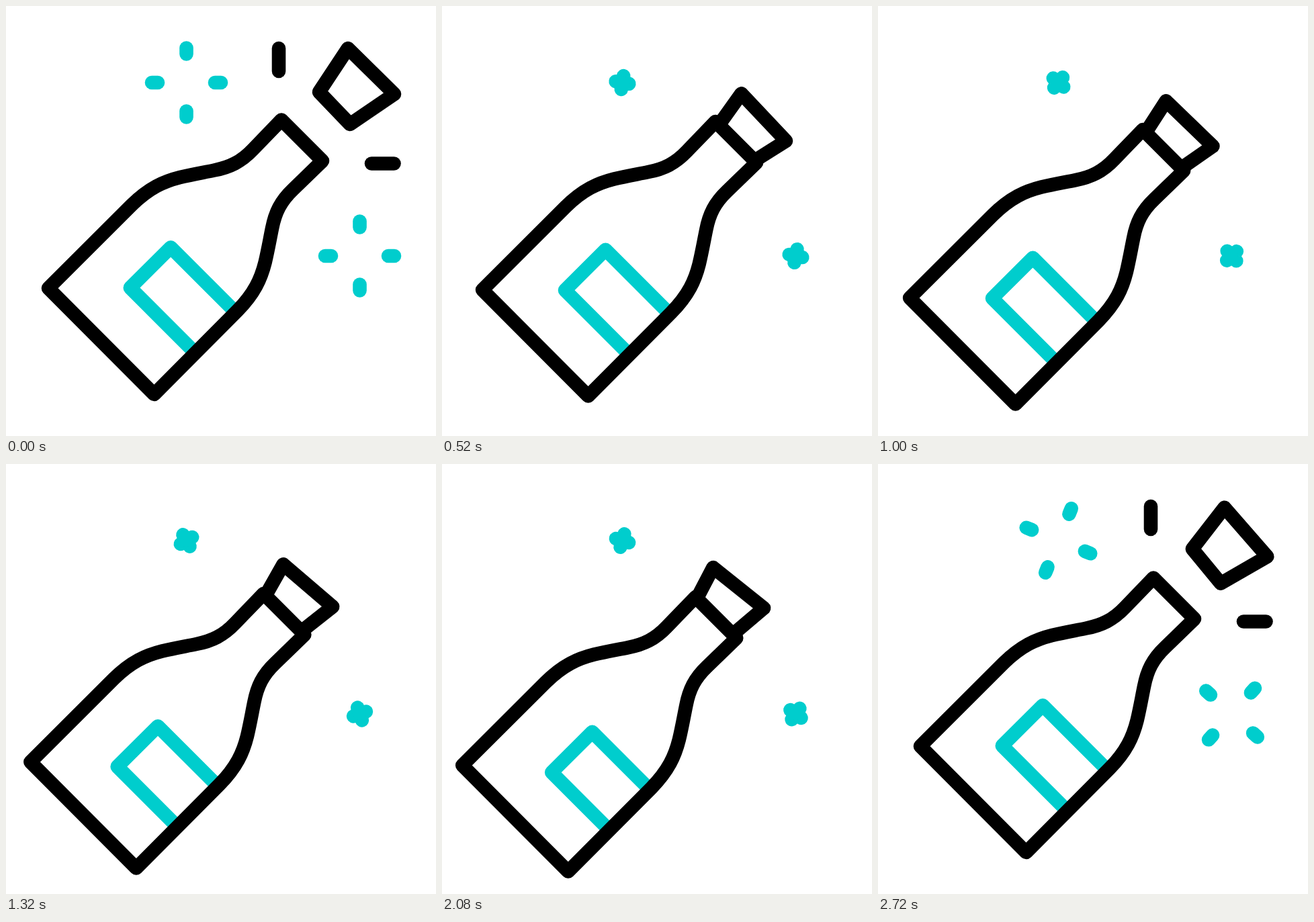
Recreate the animation shown at these times as an HTML page with a canvas. Size 640 by 640 pixels, loop 2.92 s.

```html
<!DOCTYPE html>
<html>
<head>
<meta charset="utf-8">
<style>
html, body { margin: 0; height: 100%; overflow: hidden; background: #fff; }
canvas { display: block; width: 100vmin; height: 100vmin; }
</style>
</head>
<body>
<canvas id="stage" width="640" height="640"></canvas>
<script>
const ctx = document.getElementById('stage').getContext('2d');
const BLACK = '#000', CYAN = '#00cdcd';
const STEP = 40, LAST = 68, LOOP = 2920;

const bottle = new Path2D(`M63 420 L187 296.3 C213 270.7 235 261 259 255 C277 250.7 293 248 310 244.5
  C333 240 350 232 367.5 213.5 L410 169.5 L471 230.5 L427.1 273.1 C408.6 290.6 400.6 307.6 396.1 330.6
  C392.6 347.6 389.9 363.6 385.6 381.6 C379.6 405.6 369.9 427.6 344.3 453.6 L220.5 578 Z`);
const label = new Path2D('M370 484 L245.2 359.2 L184.8 419.4 L310 544.6');
const cork = new Path2D('M509 63 L578 131 L512 176 L466 128 Z');
const corkPivot = [489, 152];

const clamp = u => Math.min(1, Math.max(0, u));
const ease = u => (u = clamp(u), u * u * (3 - 2 * u));
const mix = (a, b, u) => a + (b - a) * u;

// Close the cork, shake between low and high, pop to a peak, settle.
const times = [0, 12, 18, 24, 30, 36, 42, 48, 54, 60, 68];
function track(n, start, closed, low, high, peak, end) {
  const values = [start, closed, low, high, low, high, low, high, low, peak, end];
  let i = 0;
  while (i < times.length - 2 && n >= times[i + 1]) i++;
  return mix(values[i], values[i + 1], ease((n - times[i]) / (times[i + 1] - times[i])));
}

function line(x1, y1, x2, y2, color) {
  ctx.strokeStyle = color;
  ctx.beginPath();
  ctx.moveTo(x1, y1);
  ctx.lineTo(x2, y2);
  ctx.stroke();
}

function group(x, y, degrees, paint) {
  ctx.save();
  ctx.translate(x, y);
  ctx.rotate(degrees * Math.PI / 180);
  paint();
  ctx.restore();
}

function sparkle(x, y, degrees, spread) {
  const inner = mix(1, 42.5, spread);
  for (let k = 0; k < 4; k++)
    group(x, y, degrees + 90 * k, () => line(0, -inner, 0, -inner - 9, CYAN));
}

function drawBottle(n) {
  const slide = track(n, 0, 0, 15, 0, 0, 0);
  group(track(n, 0, 0, -39.3, -14, 26.5, 0), track(n, 0, 0, 34, 13, -26.7, 0), 0, () => {
    ctx.fill(bottle);
    ctx.save();
    ctx.clip(bottle);
    ctx.translate(slide, slide);
    ctx.strokeStyle = CYAN;
    ctx.stroke(label);
    ctx.restore();
    ctx.strokeStyle = BLACK;
    ctx.stroke(bottle);
  });
}

function drawCork(n) {
  const [px, py] = corkPivot;
  const x = track(n, 0, -63.8, -102.8, -77.5, 48, 0);
  const y = track(n, 0, 64, 98, 77, -55, 0);
  group(px + x, py + y, track(n, 0, 2.9, -8, 0, 8.5, 4.3), () => {
    ctx.translate(-px, -py);
    ctx.fill(cork);
    ctx.strokeStyle = BLACK;
    ctx.stroke(cork);
  });
}

function draw(n) {
  const spread = n < 30 ? 1 - ease(n / 9) : ease((n - 54) / 6);
  const turn = clamp((n - 9) / 45);
  ctx.fillStyle = '#fff';
  ctx.fillRect(0, 0, 640, 640);
  ctx.lineWidth = 20.6;
  ctx.lineCap = ctx.lineJoin = 'round';

  if (spread > 0) {
    const x = mix(417.5, 406, spread), y = mix(203.5, 234.5, spread);
    line(x, mix(148, 63, spread), x, mix(159, 97, spread), BLACK);
    line(mix(461, 544, spread), y, mix(475, 577.5, spread), y, BLACK);
  }
  drawCork(n);
  drawBottle(n);
  sparkle(268.5, 114, 112 * turn, spread);
  sparkle(526.5, 372, 132 * turn, spread);
}

function tick() {
  draw(Math.min(LAST, Math.floor(performance.now() % LOOP / STEP)));
  requestAnimationFrame(tick);
}
tick();
</script>
</body>
</html>
```
